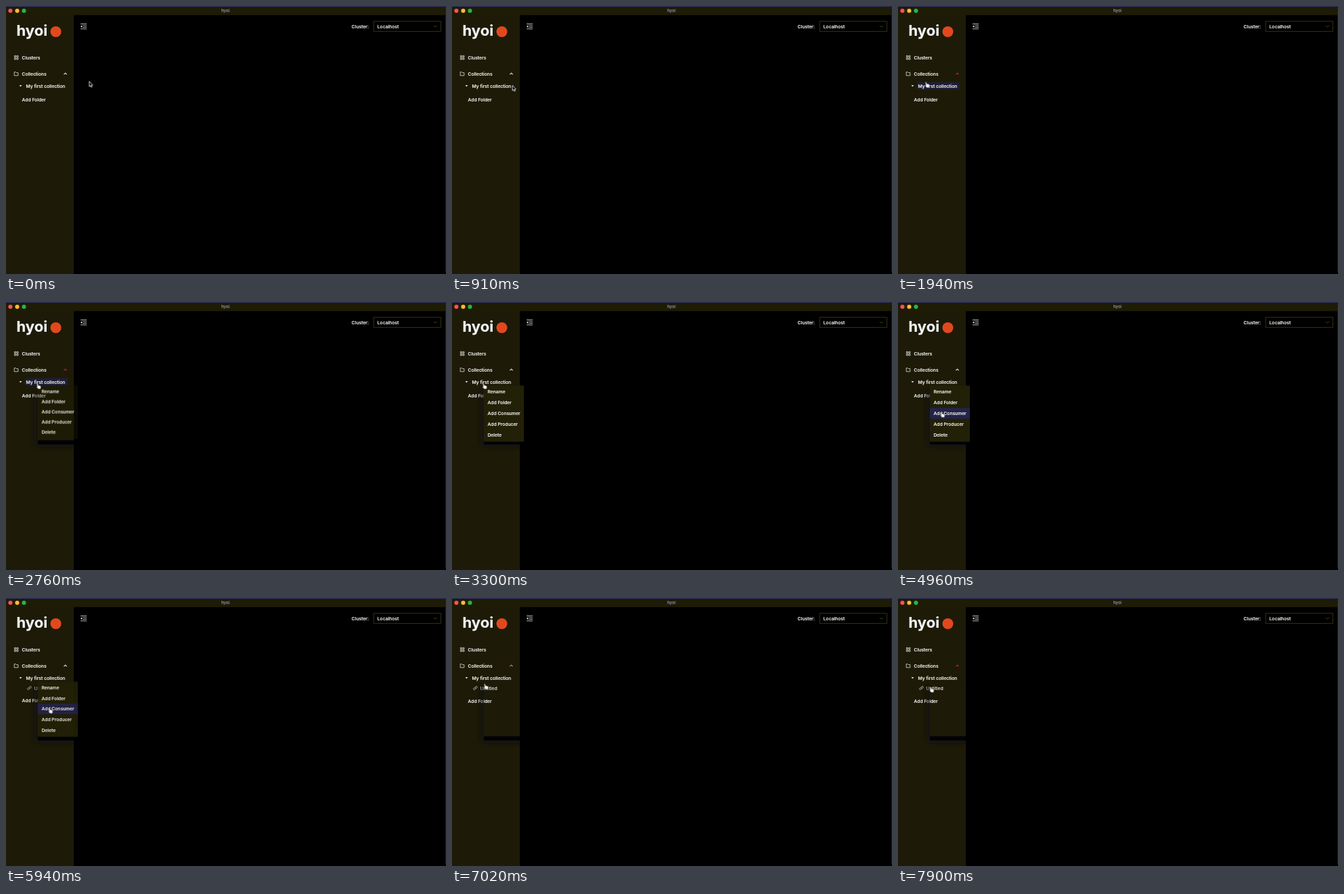
An HTML page that plays this animation: 649x396 px, repeating every 8000 ms.

```html
<!DOCTYPE html>
<html lang="en">
<head>
<meta charset="utf-8">
<title>hyoi</title>
<style>
  html, body { margin: 0; width: 100%; height: 100%; overflow: hidden; background: #000; }
  svg { display: block; width: 649px; height: 396px; }
  text { font: 500 6.75px Inter, "Open Sans", sans-serif; fill: #f6f6f4; stroke: #f6f6f4; stroke-width: .18; }
  .title { font-size: 6.2px; font-weight: 600; fill: #9292b8; stroke: none; text-anchor: middle; }
  .logo { font-size: 22px; font-weight: 700; fill: #f4f4fb; }
  .line { fill: none; stroke: #e4e4e0; stroke-width: .8; stroke-linejoin: round; }
  .anim { animation: 8s linear infinite; }

  #pointer { animation-name: move; animation-timing-function: ease-in-out; }
  @keyframes move {
    0%, 3% { transform: translate(122.5px, 111px); }
    9.6%, 11% { transform: translate(89px, 117px); }
    19%, 26% { transform: translate(41.5px, 112.5px); }
    31%, 46% { transform: translate(46.5px, 120.5px); }
    50%, 56% { transform: translate(62.5px, 154.5px); }
    62%, 77% { transform: translate(64px, 162.5px); }
    85.5%, 90% { transform: translate(48.5px, 127px); }
    95%, 100% { transform: translate(48px, 131.5px); }
  }
  #arrow { animation-name: arrow; animation-timing-function: step-end; }
  @keyframes arrow { 0% { opacity: 1; } 11.5%, 100% { opacity: 0; } }
  #hand { animation-name: hand; animation-timing-function: step-end; }
  @keyframes hand { 0% { opacity: 0; } 11.5%, 100% { opacity: 1; } }

  #chevron { animation-name: chevron; animation-timing-function: step-end; }
  @keyframes chevron {
    0% { stroke: #f0f0ec; }
    12% { stroke: #d3203a; }
    36% { stroke: #f0f0ec; }
    86.3% { stroke: #d87a98; }
    96.5%, 100% { stroke: #d3203a; }
  }
  #row { animation-name: row; animation-timing-function: step-end; }
  @keyframes row { 0% { opacity: 0; } 12% { opacity: 1; } 36%, 100% { opacity: 0; } }

  #menu { transform-origin: 47px 121px; animation-name: menu; }
  @keyframes menu {
    0%, 33.75% { opacity: 0; transform: scaleY(.8); }
    34.4%, 35.74% { opacity: .95; transform: scaleY(.95); }
    36%, 72.8% { opacity: 1; transform: none; animation-timing-function: cubic-bezier(.755, .05, .855, .06); }
    75.3%, 100% { opacity: 0; transform: scaleY(.8); }
  }
  #panel { animation-name: panel; }
  @keyframes panel {
    0%, 33.75% { opacity: 0; }
    34.4%, 35.74% { opacity: .4; }
    36%, 100% { opacity: 1; }
  }
  #hover { animation-name: hover; animation-timing-function: step-end; }
  @keyframes hover { 0% { opacity: 0; } 58%, 100% { opacity: 1; } }
  #shadow { animation-name: shadow; }
  @keyframes shadow { 0%, 33.75% { opacity: 0; } 34.4%, 100% { opacity: 1; } }

  #item { animation-name: item; }
  @keyframes item { 0%, 72% { opacity: 0; } 74.5%, 100% { opacity: .85; } }
  #add { animation-name: add; animation-timing-function: ease-in-out; }
  @keyframes add { 0%, 72% { transform: none; } 74.7%, 100% { transform: translateY(14px); } }
</style>
</head>
<body>
<svg viewBox="0 0 649 396">
  <defs>
    <filter id="blur" x="-30%" y="-30%" width="160%" height="160%"><feGaussianBlur stdDeviation="3"/></filter>
    <clipPath id="side"><path clip-rule="evenodd" d="M0 13H100V396H0ZM47 124V204H100V124Z"/></clipPath>
  </defs>

  <rect width="649" height="396"/>
  <rect y="13" width="100" height="383" fill="#1d1b07"/>
  <rect width="649" height="13.5" fill="#1e1c05"/>
  <path d="M0 .5H648" stroke="#33336e"/>
  <path d="M648.5 1V393" stroke="#25240a"/>
  <circle cx="6.5" cy="7" r="3.1" fill="#ff5257"/>
  <circle cx="16.5" cy="7" r="3.1" fill="#febc2e"/>
  <circle cx="26.5" cy="7" r="3.1" fill="#24b83e"/>
  <text class="title" x="323.7" y="9">hyoi</text>

  <text class="logo" x="15.5" y="43.5">hyoi</text>
  <circle cx="73.5" cy="38" r="8" fill="#e2481f"/>

  <path class="line" d="M12.4 73.4h2.1v2.1h-2.1zM15.9 73.4H18v2.1h-2.1zM12.4 76.9h2.1V79h-2.1zM15.9 76.9H18V79h-2.1z"/>
  <text x="23.5" y="78.5">Clusters</text>
  <path class="line" d="M12.2 97.6h2.2l.9 1h2.6v4.2h-5.7z"/>
  <text x="23.5" y="102.5">Collections</text>
  <path id="chevron" class="line anim" style="stroke-width:1.1" d="M85.4 101.2 87.5 99.2 89.6 101.2"/>
  <path d="M19.6 117h3.8l-1.9 2.2z" fill="#eee"/>
  <rect id="row" class="anim" x="28" y="112.5" width="63" height="11" rx="1" fill="#1f1e36"/>
  <text x="29.5" y="120.5">My first collection</text>

  <g id="item" class="anim">
    <path class="line" d="M33.6 132.4l1.5-1.6q1-.8 1.8 0t0 1.8l-1.5 1.5M35.2 133.6l-1.5 1.6q-1 .8-1.8 0t0-1.8l1.2-1.2M33.4 134l2-2"/>
    <text x="41.5" y="135.5">Untitled</text>
  </g>
  <text id="add" class="anim" x="23.5" y="140.5">Add Folder</text>

  <path class="line" d="M110 26.5h9M113.5 29h5.5M113.5 31.4h5.5M110 33.8h9"/>
  <path d="M112.3 28.3v3.8l-2.3-1.9z" fill="#eee"/>
  <text x="509.8" y="32.5">Cluster:</text>
  <rect x="542.5" y="22.5" width="99" height="15" fill="none" stroke="#302f0c"/>
  <text x="547.8" y="32.5">Localhost</text>
  <path class="line" style="stroke:#55551f" d="M631 29l2.4 2.3 2.4-2.3"/>

  <g clip-path="url(#side)">
    <g id="shadow" class="anim">
      <rect x="42" y="130" width="70" height="84" rx="5" fill="#0d0c1c" opacity=".55" filter="url(#blur)"/>
      <path d="M47 207.5H100" stroke="#020206" stroke-width="6"/>
    </g>
  </g>

  <g id="menu" class="anim">
    <g id="panel" class="anim">
      <rect x="47" y="123.5" width="59" height="83" rx="1" fill="#222006"/>
      <rect id="hover" class="anim" x="47" y="156.5" width="59" height="16" fill="#24234a"/>
    </g>
    <text x="52.5" y="135">Rename</text>
    <text x="52.5" y="151">Add Folder</text>
    <text x="52.5" y="167">Add Consumer</text>
    <text x="52.5" y="183">Add Producer</text>
    <text x="52.5" y="199">Delete</text>
  </g>

  <g id="pointer" class="anim" stroke-linejoin="round">
    <path id="arrow" class="anim" d="M.3.3V8l1.7-1.5 1.2 2.6 1.2-.5-1.1-2.6h2.2z" fill="#000" stroke="#fff" stroke-width=".8"/>
    <path id="hand" class="anim" transform="translate(-1.8 -.8)" d="M.5 1q.9-1 1.6 0L2.8 3.2l3 .8q1.2.5 1 1.9L6.3 8.8H2.7L.2 5.9q0-1 1.2-.4z" fill="#fff" stroke="#111" stroke-width=".5"/>
  </g>
</svg>
</body>
</html>
```
